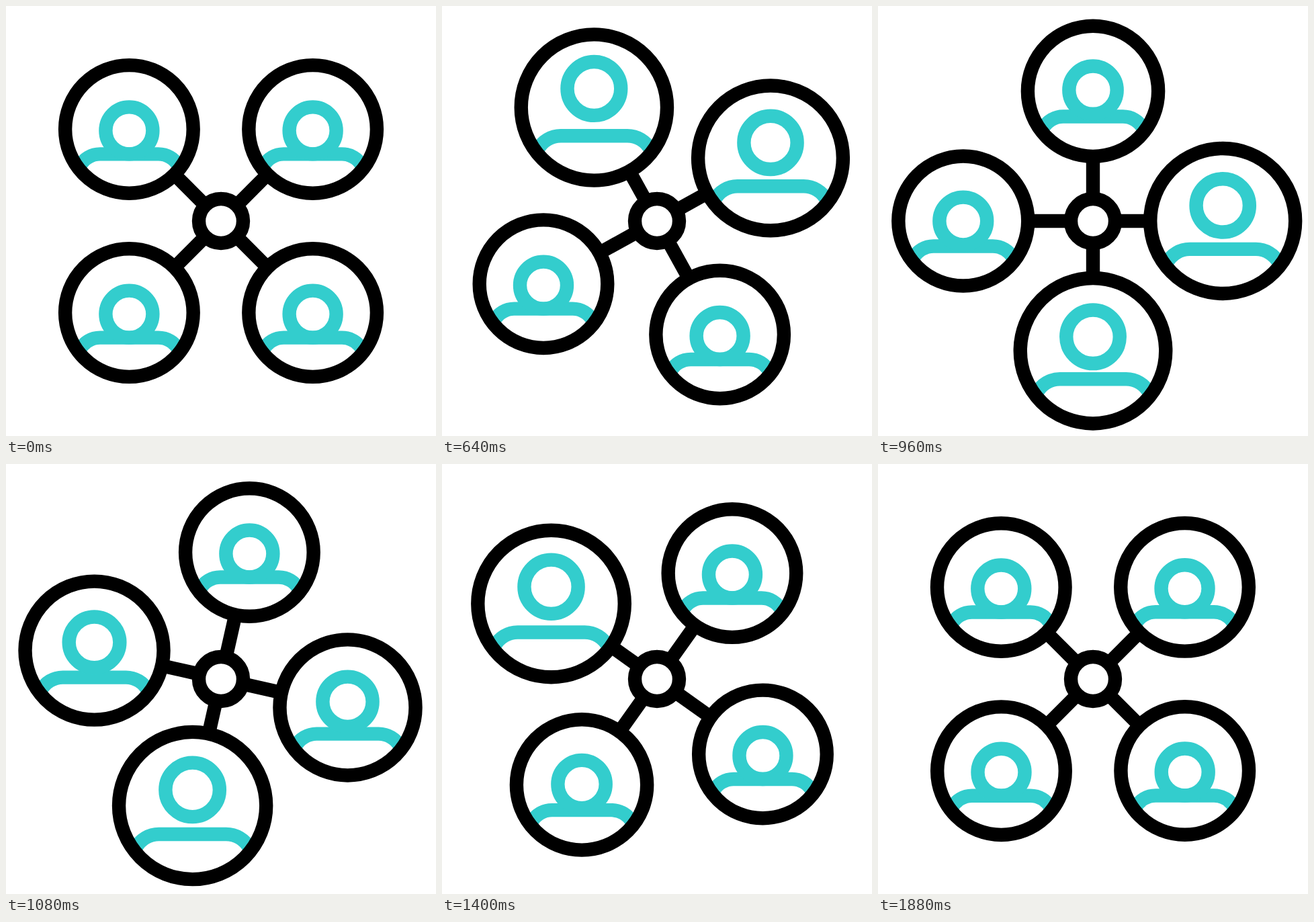
These frames come from a looping animation (640 px wide and 640 px high, 1.92 s). An HTML page:

```html
<!DOCTYPE html>
<html lang="en">
<head>
<meta charset="utf-8">
<title>Network</title>
<style>
html, body { margin: 0; width: 100%; height: 100%; overflow: hidden; background: #fff; }
svg { display: block; width: 100vw; height: 100vh; }
</style>
</head>
<body>
<svg id="stage" viewBox="0 0 640 640" fill="none" stroke="#000" stroke-width="20.4">
  <g id="spokes"></g>
  <circle cx="320" cy="320" r="33" fill="#fff"/>
  <g id="nodes"></g>
</svg>
<script>
const LOOP = 1920, CENTER = 320, ORBIT = 193.2, RING = 95.3, TEAL = '#33cdcd';

// Clockwise from the upper left: swell start, full, shrink start, end (ms), growth, head lift.
const nodes = [
  { angle: -135, times: [115, 530, 666, 1086], grow: 0.14, lift: 26.6 },
  { angle: -45, times: [340, 740, 860, 1270], grow: 0.145, lift: 24.4 },
  { angle: 45, times: [648, 1068, 1103, 1523], grow: 0.15, lift: 22.5 },
  { angle: 135, times: [855, 1290, 1330, 1820], grow: 0.15, lift: 24.7 }
];

function add(parent, tag, attrs) {
  const el = document.createElementNS('http://www.w3.org/2000/svg', tag);
  set(el, attrs);
  parent.appendChild(el);
  return el;
}

function set(el, attrs) {
  for (const key in attrs) el.setAttribute(key, attrs[key]);
}

// Symmetric cubic-bezier(.57, 0, .43, 1), solved by bisection.
function ease(x) {
  if (x <= 0) return 0;
  if (x >= 1) return 1;
  let lo = 0, hi = 1;
  for (let i = 0; i < 30; i++) {
    const s = (lo + hi) / 2, r = 1 - s;
    if (1.71 * s * r * r + 1.29 * s * s * r + s * s * s < x) lo = s;
    else hi = s;
  }
  return lo * lo * (3 - 2 * lo);
}

function swell(t, [start, full, shrink, end]) {
  return ease((t - start) / (full - start)) - ease((t - shrink) / (end - shrink));
}

const spokes = document.getElementById('spokes');
const group = document.getElementById('nodes');
for (const node of nodes) {
  add(spokes, 'path', { d: 'M33 0H91', transform: `translate(320 320) rotate(${node.angle})` });
  node.el = add(group, 'g', {});
  node.body = add(node.el, 'path', { stroke: TEAL });
  node.head = add(node.el, 'circle', { stroke: TEAL });
  node.ring = add(node.el, 'circle', {});
}

function shoulders(k) {
  const [out, flat, top, low, r] = [73.5, 43.5, 37, 55, 34].map(v => v * k);
  return `M${-out} ${low}A${r} ${r} 0 0 1 ${-flat} ${top}H${flat}A${r} ${r} 0 0 1 ${out} ${low}`;
}

function draw(t) {
  const turn = 90 * ease(t / LOOP);
  spokes.setAttribute('transform', `rotate(${turn} ${CENTER} ${CENTER})`);
  for (const { angle, times, grow, lift, el, body, head, ring } of nodes) {
    const a = (angle + turn) * Math.PI / 180;
    const p = swell(t, times), k = 1 + grow * p;
    const x = CENTER + ORBIT * Math.cos(a), y = CENTER + ORBIT * Math.sin(a);
    el.setAttribute('transform', `translate(${x} ${y})`);
    ring.setAttribute('r', RING * k);
    set(head, { r: 35 * k, cy: (2 - lift * p) * k });
    body.setAttribute('d', shoulders(k));
  }
}

let begin;
function tick(now) {
  if (begin === undefined) begin = now;
  draw((now - begin) % LOOP);
  requestAnimationFrame(tick);
}
draw(0);
requestAnimationFrame(tick);
</script>
</body>
</html>
```
